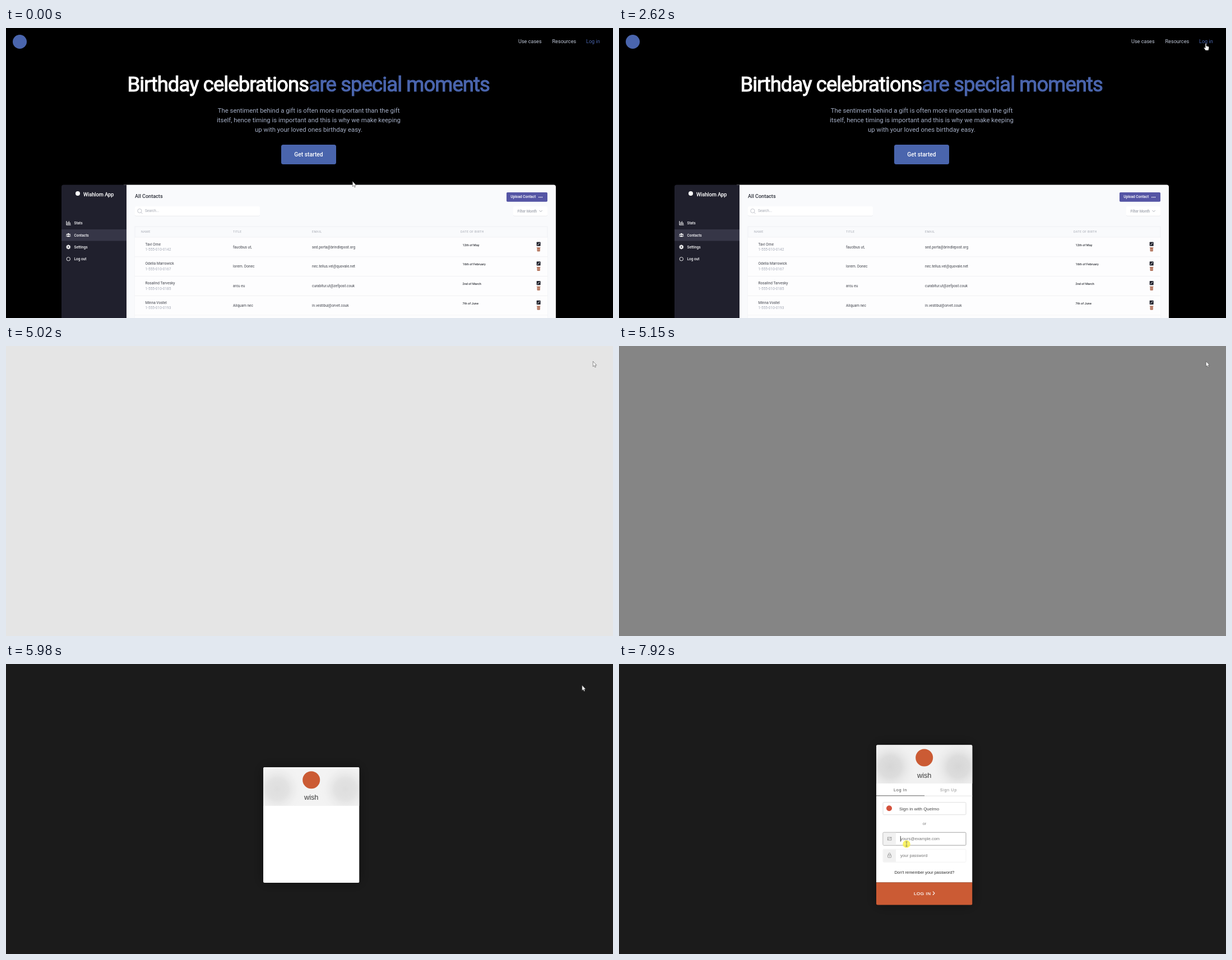
These frames come from a looping animation (1083x517 px, 8000 ms). An HTML page:

```html
<!DOCTYPE html>
<html lang="en">
<head>
<meta charset="utf-8">
<title>Log in flow</title>
<style>
  html, body { margin: 0; width: 100%; height: 100%; overflow: hidden; background: #000; }
  svg { display: block; width: 100vw; height: 100vh; font-family: Roboto, sans-serif; }
  .card { font-family: "Liberation Sans", Arial, sans-serif; }
  .mid { text-anchor: middle; }
  .med { font-weight: 500; }
  .line { fill: none; stroke-linecap: round; stroke-linejoin: round; }
</style>
</head>
<body>
<svg id="stage" viewBox="0 0 1083 517" xmlns="http://www.w3.org/2000/svg"></svg>
<script>
const LOOP = 8000;
const BLUE = '#4a65ad', ORANGE = '#cb5b34';

const text = (x, y, size, str, fill, more = '') =>
  `<text x="${x}" y="${y}" font-size="${size}" fill="${fill}" ${more}>${str}</text>`;
const rect = (x, y, w, h, fill, more = '') =>
  `<rect x="${x}" y="${y}" width="${w}" height="${h}" fill="${fill}" ${more}/>`;
const circle = (x, y, r, fill, more = '') =>
  `<circle cx="${x}" cy="${y}" r="${r}" fill="${fill}" ${more}/>`;
const line = (d, stroke, width = 1) =>
  `<path class="line" d="${d}" stroke="${stroke}" stroke-width="${width}"/>`;

// Landing page
const contacts = [
  ['Tavi Orne', '1-555-010-0142', 'faucibus ut,', 'sed.porta@brindlepost.org', '12th of May'],
  ['Odelia Marrowick', '1-555-010-0167', 'lorem. Donec', 'nec.tellus.vel@quovale.net', '16th of February'],
  ['Rosalind Tarvesky', '1-555-010-0185', 'arcu eu', 'curabitur.ut@zefpost.couk', '2nd of March'],
  ['Minna Vostel', '1-555-010-0193', 'Aliquam nec', 'in.vestibul@orvet.couk', '7th of June']
];

function contactRow([name, phone, title, email, date], i) {
  const y = 373 + i * 34.75;
  return rect(230, y, 736, 34.75, '#fdfdfe') +
    line(`M230 ${y}H966`, '#ececf0', .7) +
    text(248.5, y + 14.5, 6.6, name, '#41444c') +
    text(248.5, y + 24.2, 6.55, phone, '#a3a8b4') +
    text(405, y + 19.5, 6.5, title, '#41444c') +
    text(546, y + 19.5, 6.5, email, '#41444c') +
    text(814.5, y + 15.6, 5.6, date, '#33363c', 'class="med"') +
    rect(946.7, y + 8.5, 7, 7.2, '#22242e', 'rx=".8"') +
    line(`M948.6 ${y + 13.8}l3.2-3.4`, '#fff', 1) +
    rect(947.6, y + 19, 5.2, 6.2, '#a9644a', 'rx=".6"') +
    line(`M947.2 ${y + 18.6}h6`, '#a9644a', .9) +
    line(`M949.2 ${y + 20.5}v3.2M951.2 ${y + 20.5}v3.2`, '#f3ddd4', .6);
}

function sidebar() {
  const items = ['Stats', 'Contacts', 'Settings', 'Log out'];
  const gear = [0, 45, 90, 135].map(a =>
    `<path d="M111.3 386.4v8" stroke="#fff" stroke-width="1.6" transform="rotate(${a} 111.3 390.4)"/>`).join('');
  return '<path d="M99 517V283.5a4 4 0 0 1 4-4H215V517Z" fill="#20202d"/>' +
    rect(99, 359, 116, 20.5, '#363647') +
    circle(128, 295, 4, '#fff') +
    text(138, 299.8, 9.2, 'Wishlorn App', '#fff', 'stroke="#fff" stroke-width=".3"') +
    items.map((s, i) => text(121.5, 350.2 + i * 21.3, 6.5, s, '#f4f4f7', 'class="med"')).join('') +
    line('M108 344.5v6.5h7.3M110.3 349.3v-2.6M112.3 349.3v-4.4M114.3 349.3v-2', '#fff', 1.1) +
    circle(111.3, 367.4, 1.6, '#fff') + circle(108.6, 368, 1.1, '#fff') + circle(114, 368, 1.1, '#fff') +
    '<path d="M108.7 372.3a2.6 2.6 0 0 1 5.2 0ZM107 371.6q0-2 1.8-2l-.6 2ZM115.6 371.6q0-2-1.8-2l.6 2Z" fill="#fff"/>' +
    gear + circle(111.3, 390.4, 2.9, '#fff') + circle(111.3, 390.4, 1.2, '#20202d') +
    circle(111.3, 411.8, 3.2, 'none', 'stroke="#fff" stroke-width=".9"');
}

function dashboard() {
  const heads = [[241, 'NAME'], [405, 'TITLE'], [546, 'EMAIL'], [811, 'DATE OF BIRTH']];
  return '<path d="M210 279.5H977a4 4 0 0 1 4 4V517H210Z" fill="#f9fafc"/>' + sidebar() +
    text(230, 303, 9.1, 'All Contacts', '#2a2d37', 'class="med"') +
    rect(893, 293, 73, 16.7, '#5555a5', 'rx="1.8"') +
    text(900.3, 303.4, 6.5, 'Upload Contact', '#fff', 'class="med"') +
    [951, 953.7, 956.4].map(x => circle(x, 301.6, .9, '#fff')).join('') +
    rect(230, 318.6, 223, 17, '#e6e7ec', 'rx="2"') + rect(230, 318, 223, 16.8, '#fff', 'rx="2"') +
    circle(238.4, 326, 3.6, 'none', 'stroke="#b4b7c0" stroke-width=".8"') + line('M241 328.7l2.3 2.3', '#b4b7c0', .8) +
    text(248, 328.4, 6.45, 'Search...', '#a2a6b0') +
    rect(905, 318.6, 61, 17, '#e6e7ec', 'rx="2"') + rect(905, 318, 61, 16.8, '#fff', 'rx="2"') +
    text(912.5, 328.5, 6.4, 'Filter Month', '#9fa3ad', 'class="med"') +
    line('M951.7 325.2l2.4 2.4 2.4-2.4', '#9fa3ad', .9) +
    rect(230, 354, 736, 163, '#f9fafc', 'stroke="#ececf0" stroke-width=".7"') +
    heads.map(([x, s]) => text(x, 364.8, 5.5, s, '#a4a8b2', 'letter-spacing=".28"')).join('') +
    contacts.map(contactRow).join('') + line('M230 512H966', '#ececf0', .7) +
    rect(230, 512.4, 736, 5, '#fdfdfe');
}

function landing() {
  const title = (x, s, c) => text(x, 113.2, 36.5, s, c, `letter-spacing="-.9125" stroke="${c}" stroke-width="1.1"`);
  const copy = [
    'The sentiment behind a gift is often more important than the gift',
    'itself, hence timing is important and this is why we make keeping',
    'up with your loved ones birthday easy.'
  ];
  return rect(0, 0, 1083, 517, '#000') +
    circle(24.5, 24.5, 12.5, BLUE) +
    text(914, 27.4, 9.12, 'Use cases', '#c0c8d8') +
    text(974.5, 27.4, 9.12, 'Resources', '#c0c8d8') +
    text(1035, 27.4, 9.12, 'Log in', BLUE) +
    title(216.5, 'Birthday celebrations', '#fff') + title(540.5, 'are special moments', BLUE) +
    copy.map((s, i) => text(540, 151 + i * 17.2, 11.4, s, '#a5afc6', 'class="mid"')).join('') +
    rect(491, 208, 98, 35, BLUE, 'rx="3.5"') +
    text(540, 229, 10.25, 'Get started', '#fff', 'class="mid med"') +
    dashboard() +
    rect(1034.6, 16.7, 26.6, 15.6, 'none', 'id="ring" rx="2" stroke="#fff" stroke-width="1.3"');
}

// Login card, in coordinates relative to its top left corner
const CARD_W = 171.5;

function loginCard() {
  const field = (y, border, hint) =>
    rect(12, y, 148, 23, '#fff', `rx="1.5" stroke="${border}"`) + rect(12.5, y + .5, 22.5, 22, '#f1f1f1') +
    text(43, y + 14.2, 7.44, hint, '#757575');
  const form =
    text(43, 83, 7.4, 'Log In', '#4c4c4c', 'class="mid" letter-spacing=".55"') +
    text(128.8, 83, 7.4, 'Sign Up', '#8f8f8f', 'class="mid" letter-spacing=".55"') +
    line('M0 91H171.5', '#dcdcdc', .8) + line('M0 90.6H85.7', '#707070', 1) +
    rect(12, 102.5, 148, 22, '#fff', 'rx="1.5" stroke="#dedede"') + circle(23, 113, 5, '#d4523c') +
    text(41, 117, 8, 'Sign in with Quelmo', '#444') +
    text(86, 142.5, 7.4, 'or', '#808080', 'class="mid"') +
    field(156, '#a3a3a3', 'yours@example.com') + field(186, '#f1f1f1', 'your password') +
    line('M43.3 163v9', '#333', .9) +
    rect(20.3, 164.8, 6.6, 5, 'none', 'stroke="#8c8c8c" stroke-width=".8"') + line('M20.5 168.8l2.3-1.8M24 167.2l2.7-2.2', '#8c8c8c', .8) +
    rect(20.6, 196.2, 6, 4.6, 'none', 'rx=".6" stroke="#8c8c8c" stroke-width=".8"') +
    line('M21.8 196v-1.4a1.8 1.8 0 0 1 3.6 0v1.4M23.6 198v1', '#8c8c8c', .8) +
    text(86, 229.7, 7.4, 'Don\'t remember your password?', '#2c2c2c', 'class="mid"') +
    rect(0, 245.2, CARD_W, 41, ORANGE) +
    text(67, 268, 8, 'LOG IN', '#fff', 'letter-spacing=".6" stroke="#fff" stroke-width=".2"') +
    line('M101.3 261.7l2.7 2.8-2.7 2.8', '#fff', 1.1);
  return '<g id="card" class="card">' +
    rect(.5, .5, CARD_W - 1, 205, '#1b1b1b', 'id="back" rx="3" filter="url(#shadow)"') +
    '<g clip-path="url(#cardClip)">' + rect(0, 0, CARD_W, 245.2, '#fff') +
    '<g id="head">' + rect(0, 0, CARD_W, 68.8, '#f1f1f1') +
    rect(0, 0, CARD_W, 68.8, 'url(#left)') + rect(0, 0, CARD_W, 68.8, 'url(#right)') + '</g>' +
    circle(85.7, 22.8, 15.5, ORANGE) +
    text(85.7, 58.4, 12.8, 'wish', '#3a3a3a', 'class="mid"') +
    `<g id="form">${form}</g></g></g>`;
}

const blur = (id, x) => `<radialGradient id="${id}" gradientUnits="userSpaceOnUse" cx="${x}" cy="39" r="48">
  <stop offset="0" stop-color="#d6d6d6"/><stop offset=".4" stop-color="#d9d9d9" stop-opacity=".85"/>
  <stop offset="1" stop-color="#f1f1f1" stop-opacity="0"/></radialGradient>`;

const stage = document.getElementById('stage');
stage.innerHTML = `<defs>
  ${blur('left', 25)}${blur('right', 146.5)}
  <filter id="shadow" x="-30%" y="-30%" width="160%" height="160%"><feDropShadow dx="0" dy="0" stdDeviation="11" flood-opacity=".4"/></filter>
  <clipPath id="cardClip"><rect id="clip" width="${CARD_W}" height="206" rx="2.5"/></clipPath></defs>
  <g id="landing">${landing()}</g>
  <g id="login">${rect(0, 0, 1083, 517, '#fff')}${rect(0, 0, 1083, 517, '#000', 'id="shade"')}${loginCard()}</g>
  <g id="pointer">${circle(0, 0, 6.8, '#f7f04a', 'id="click" opacity=".85"')}
  <path id="arrow" d="M.3.3V9.6L2.4 7.8 3.9 11 5.4 10.3 4 7.2H6.7Z" fill="#fff" stroke="#444" stroke-width=".6"/>
  <path id="hand" d="M-1 1Q0-.6 1 1V5L5 6Q6 6.5 5.7 8.5L4.8 13H-.6L-3.3 9Q-3.6 7.2-2.2 7.4L-1 8.6Z" fill="#fff" stroke="#111" stroke-width=".7"/>
  <path id="beam" class="line" d="M-1.4-4H1.4M0-4V4M-1.4 4H1.4" stroke="#666" stroke-width=".7"/></g>`;

const el = {};
stage.querySelectorAll('[id]').forEach(n => el[n.id] = n);

// The picture is refreshed in runs: first time, last time, number of steps
const runs = [
  [520, 1040, 5], [1300, 1820, 5], [1970, 2100, 2], [2360, 2620, 3], [3420, 3420, 1], [3690, 3690, 1],
  [4350, 4350, 1], [5020, 5150, 2], [5300, 5300, 1], [5570, 5830, 3], [5980, 6750, 7], [6880, 7660, 7], [7790, 7920, 2]
];
const ticks = runs.flatMap(([a, b, n]) =>
  Array.from({ length: n }, (_, i) => n > 1 ? Math.floor((a + (b - a) * i / (n - 1)) / 10) * 10 : a));

// Pointer stops: time, x, y
const stops = [
  [0, 618, 273], [390, 618, 273], [1040, 991, 80], [1170, 991, 80], [1820, 1038, 38], [2100, 1045, 30],
  [2230, 1045, 30], [2620, 1047, 27], [5830, 1047, 27], [6880, 696, 221], [7660, 497, 311], [7790, 513, 321], [LOOP, 513, 321]
];

const clamp = v => Math.max(0, Math.min(1, v));
const mix = (a, b, p) => a + (b - a) * p;
const smooth = p => p * p * (3 - 2 * p);
const easeOut = p => 1 - (1 - p) ** 3;
const show = (node, on) => node.setAttribute('display', on ? 'inline' : 'none');

function pointerAt(t) {
  const i = Math.max(1, stops.findIndex(s => s[0] >= t));
  const [a, b] = [stops[i - 1], stops[i]];
  const p = smooth(clamp((t - a[0]) / (b[0] - a[0])));
  return [mix(a[1], b[1], p), mix(a[2], b[2], p)];
}

function draw(time) {
  const t = ticks.reduce((last, tick) => tick <= time ? tick : last, 0);
  const onLogin = t >= 5020;
  show(el.landing, !onLogin);
  show(el.login, onLogin);
  show(el.ring, t >= 3420);

  // The shade deepens to 0.9 over the blank page
  el.shade.setAttribute('opacity', t >= 5300 ? .895 : t >= 5150 ? .48 : .102);

  const enter = easeOut(clamp((t - 5450) / 380));
  const grow = easeOut(clamp((t - 6880) / 390));
  const h = mix(206, 285.2, grow), y = mix(184, 144.2, grow), scale = mix(.8, 1, enter);
  show(el.card, t >= 5570);
  el.card.setAttribute('opacity', enter);
  el.card.setAttribute('transform',
    `translate(${459 + CARD_W / 2} ${y + h / 2 + 30 * (1 - enter)}) scale(${scale}) translate(${-CARD_W / 2} ${-h / 2})`);
  el.back.setAttribute('height', h - 1);
  el.clip.setAttribute('height', h);
  el.head.setAttribute('opacity', clamp((t - 5570) / 500));
  el.form.setAttribute('opacity', grow);

  const [px, py] = pointerAt(t);
  const hand = t >= 2100 && t < 4350, beam = t >= 7660;
  el.pointer.setAttribute('transform', `translate(${px} ${py})`);
  show(el.hand, hand);
  show(el.beam, beam);
  show(el.arrow, !hand && !beam);
  show(el.click, (t >= 3420 && t < 3690) || t >= 7920);
}

const start = performance.now();
function loop() {
  draw((performance.now() - start) % LOOP);
  requestAnimationFrame(loop);
}
loop();
</script>
</body>
</html>
```
